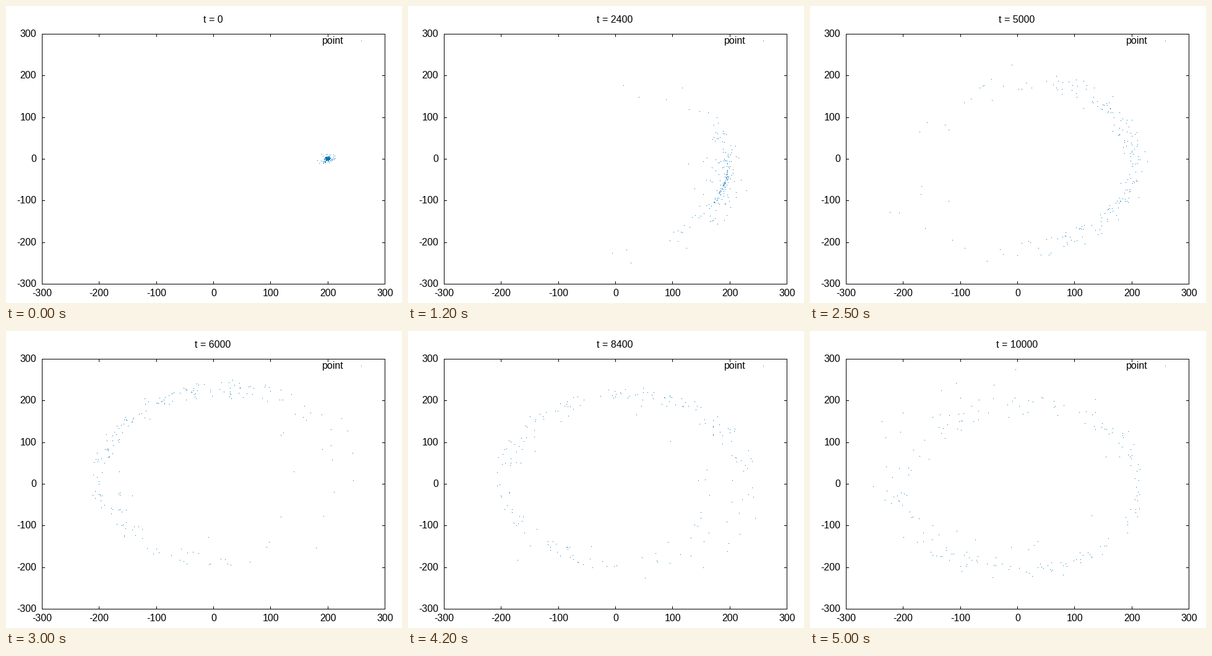
Animation, 640 px wide and 480 px high, one loop 5100 ms. Source, as a matplotlib script:

```python
import numpy as np
import matplotlib.pyplot as plt
from matplotlib.animation import FuncAnimation
from matplotlib.patches import Rectangle

W, H, DPI = 640, 480, 100
FRAMES, INTERVAL = 51, 100
T_STEP = 200                                # model time per frame
LEFT, RIGHT, TOP, BOTTOM = 58, 612, 45, 449  # plot border in pixels
LIMIT = 300
BLUE = "#0072b2"

# Star cluster circling a softened central mass
STARS = 200
RADIUS = 200.0
SOFT = 60.0
PERIOD = 2410.0
SUBSTEPS = 50
ESCAPE_FRAMES = 18                          # cluster has dissolved by then

plt.rcParams["font.family"] = "Liberation Sans"


def unit_vectors(rng, n):
    v = rng.normal(size=(n, 3))
    return v / np.linalg.norm(v, axis=1, keepdims=True)


def start_state(rng, speed):
    spread = 3 / np.sqrt(rng.uniform(0.02, 0.988, STARS) ** (-2 / 3) - 1)
    pos = (unit_vectors(rng, STARS) * spread[:, None])[:, :2]
    pos[:, 0] += RADIUS
    wobble = rng.uniform(0, 0.02, (STARS, 1))
    vel = (unit_vectors(rng, STARS) * wobble)[:, :2]
    vel[:, 1] += 1.02
    return pos, vel * speed


def escape_kicks(rng, speed):
    """Kick along and across the motion, stronger for stars falling inward."""
    size = rng.uniform(0.03, 0.095, (STARS, 1)) * speed
    along, across = (unit_vectors(rng, STARS) * size)[:, :2].T
    return np.where(along < 0, 1.7 * along, along), across


def simulate():
    rng = np.random.default_rng(7)
    omega = 2 * np.pi / PERIOD
    speed = omega * RADIUS
    gm = omega ** 2 * (RADIUS ** 2 + SOFT ** 2) ** 1.5

    def pull(p):
        d2 = (p ** 2).sum(axis=1, keepdims=True) + SOFT ** 2
        return -gm * p / d2 ** 1.5

    pos, vel = start_state(rng, speed)
    along, across = escape_kicks(rng, speed)
    escape = rng.integers(0, ESCAPE_FRAMES, STARS)
    dt = T_STEP / SUBSTEPS
    track = [pos.copy()]
    for i in range(FRAMES - 1):
        ahead = vel / np.linalg.norm(vel, axis=1, keepdims=True)
        side = np.column_stack([ahead[:, 1], -ahead[:, 0]])
        kick = ahead * along[:, None] + side * across[:, None]
        vel += kick * (escape == i)[:, None]
        for _ in range(SUBSTEPS):
            vel += pull(pos) * dt / 2
            pos += vel * dt
            vel += pull(pos) * dt / 2
        track.append(pos.copy())
    return track


def to_px(x):
    return LEFT + (x + LIMIT) * (RIGHT - LEFT) / (2 * LIMIT)


def to_py(y):
    return BOTTOM - (y + LIMIT) * (BOTTOM - TOP) / (2 * LIMIT)


fig = plt.figure(figsize=(W / DPI, H / DPI), dpi=DPI, facecolor="white")
ax = fig.add_axes([0, 0, 1, 1])
ax.set_xlim(0, W)
ax.set_ylim(H, 0)
ax.axis("off")


def bar(x, y, w, h):
    ax.add_patch(Rectangle((x, y), w, h, facecolor="black", linewidth=0,
                           antialiased=False))


def label(x, y, text, align="center"):
    return ax.text(x, y, text, fontsize=16 * 72 / DPI, ha=align,
                   va="baseline", color="black")


def draw_axes():
    for y in (TOP, BOTTOM):
        bar(LEFT, y, RIGHT - LEFT + 1, 1)
    for x in (LEFT, RIGHT):
        bar(x, TOP, 1, BOTTOM - TOP + 1)
    for v in range(-LIMIT, LIMIT + 1, 100):
        x, y = round(to_px(v)), round(to_py(v))
        bar(x, TOP, 1, 5)
        bar(x, BOTTOM - 4, 1, 5)
        bar(LEFT, y, 5, 1)
        bar(RIGHT - 4, y, 5, 1)
        label(x + (v >= 0), 469, str(v))
        label(49, y + 5, str(v), "right")


draw_axes()
label(546, 61, "point", "right")
ax.plot([574], [57], ",", color=BLUE)
title = label(334.6, 27, "t = 0")
dots, = ax.plot([], [], ",", color=BLUE)
track = simulate()


def update(i):
    pos = track[i]
    x, y = pos[(np.abs(pos) < LIMIT).all(axis=1)].T
    dots.set_data(np.round(to_px(x)), np.round(to_py(y)))
    title.set_text(f"t = {i * T_STEP}")
    return dots, title


anim = FuncAnimation(fig, update, frames=FRAMES, interval=INTERVAL,
                     repeat=True, repeat_delay=0)
plt.show()
```
